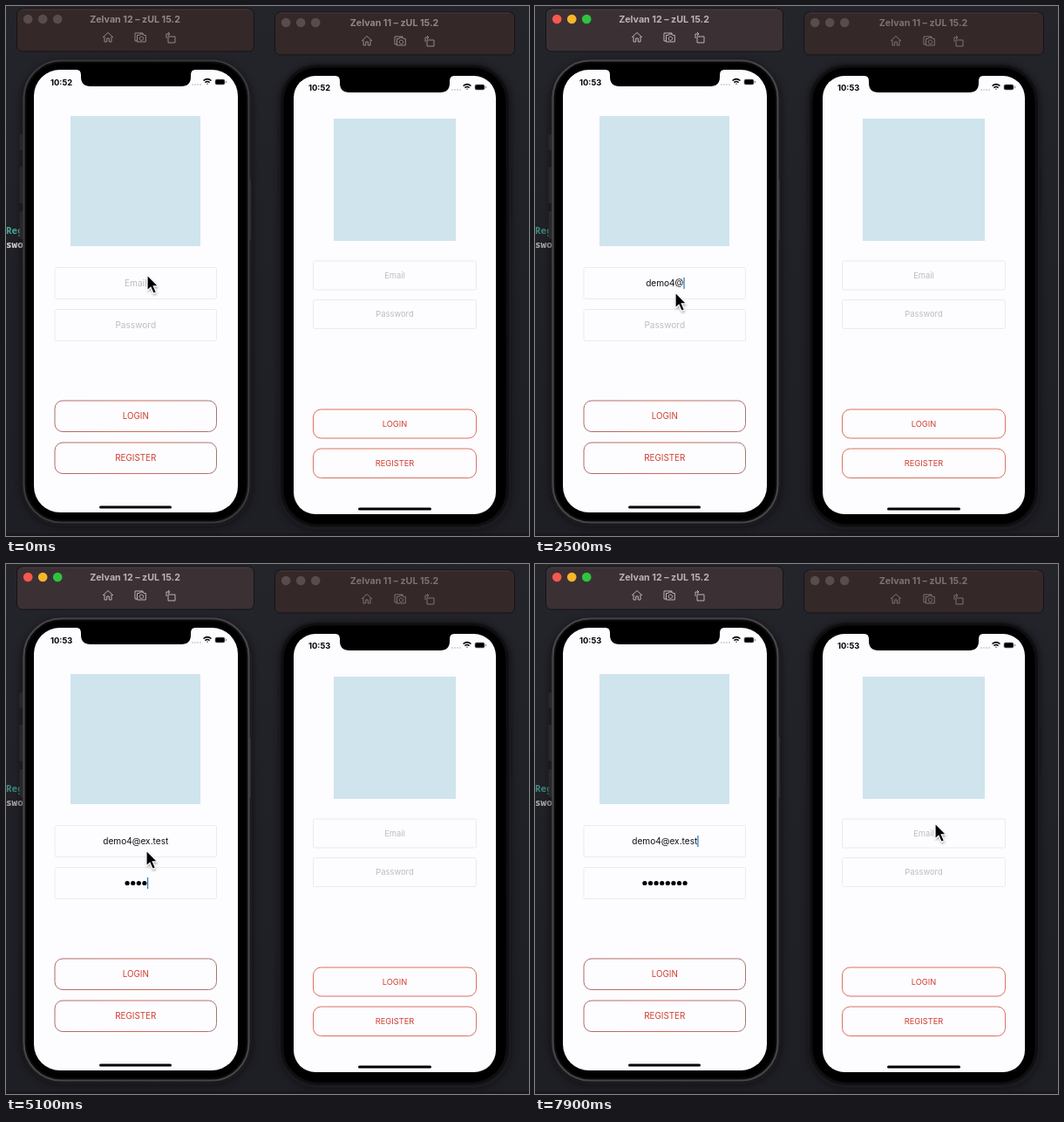
Write an HTML page that moves like this. It is 600 px wide and 607 px high and loops after 8000 ms.

```html
<!DOCTYPE html>
<html lang="en">
<head>
<meta charset="utf-8">
<title>Login screens</title>
<style>
  html, body { margin: 0; width: 100%; height: 100%; overflow: hidden; background: #202027; }
  svg { display: block; width: 100vw; height: 100vh; }
  text { font-family: Inter, Roboto, sans-serif; white-space: pre; }
  .mid { text-anchor: middle; }
  .code { font: bold 11px "Noto Sans Mono", "DejaVu Sans Mono", monospace; }
</style>
</head>
<body>
<svg id="stage" viewBox="0 0 600 607" xmlns="http://www.w3.org/2000/svg"></svg>
<script>
const EMAIL = 'demo4@ex.test';
const LIGHTS = ['#f9574f', '#f7b52c', '#2fc440'];
const PAPER = '#fdfcff';
const stage = document.getElementById('stage');

const rect = (x, y, w, h, r, fill, more = '') =>
  `<rect x="${x}" y="${y}" width="${w}" height="${h}" rx="${r}" fill="${fill}" ${more}/>`;
const label = (x, y, size, fill, text, more = '') =>
  `<text class="mid" x="${x}" y="${y}" font-size="${size}" fill="${fill}" ${more}>${text}</text>`;

// Window bar with three lights, a title and home, camera and rotate icons.
function titleBar(id, x, y, w, title, icons) {
  const lights = LIGHTS.map((c, i) =>
    `<circle cx="${x + 12.7 + 17 * i}" cy="${y + 12}" r="5.3"/>`).join('');
  const shapes = [
    'M-6 0L0-5.5 6 0M-4 -1V5H-1.3V1H1.3V5H4V-1',
    'M-3.5 4H-6V-5H3V-3M-3.5-2.5H-1L0-4H3L4-2.5H6.3V5H-3.5ZM1.4-1a2.2 2.2 0 1 0 .01 0',
    'M-3-1H5V6H-3ZM-5 1V-4H-1M-3-6L-1-4-3-2'
  ].map((d, i) => `<path d="${d}" transform="translate(${icons[i]} ${y + 33})"/>`).join('');
  return `<g id="${id}">
    ${rect(x, y, w, 49, 6, '#352829', 'stroke="#151317"')}
    <path d="M${x + 6} ${y + 1}h${w - 12}" stroke="#534748" stroke-width=".7"/>
    ${lights}
    ${label(x + w / 2 - .5, y + 15.5, 10.7, '#978d8f', title, 'font-weight="700"')}
    <g fill="none">${shapes}</g>
  </g>`;
}

function notch(x, y, w) {
  return `<path d="M${x} ${y - 1}v1q5 0 5 6v2q0 11 11 11h${w - 32}q11 0 11-11v-2q0-6 5-6v-1z"/>`;
}

function status(x, right, y, id) {
  const dots = [0, 3, 6, 9].map(i => `<circle cx="${right - 38 + i}" cy="${y - 1}" r=".8" fill="#aaa"/>`).join('');
  return `<text id="${id}" x="${x}" y="${y}" font-size="9.3" font-weight="700">10:52</text>${dots}
    <g transform="translate(${right - 21} ${y - 1})" fill="none" stroke="#000" stroke-width="1.5">
      <path d="M-4.5-4.5q4.5-3.8 9 0M-2.6-2.4q2.6-2 5.2 0"/><path d="M-1-1.3h2L0 0z" fill="#000" stroke="none"/></g>
    ${rect(right - 12, y - 7, 11, 6, 1.8, '#000', 'stroke="#888" stroke-width=".7"')}
    <path d="M${right + .7} ${y - 5.2}v2.4" stroke="#888"/>`;
}

const field = (x, y, w, h, size, text, id) =>
  rect(x, y, w, h, 2, PAPER, 'stroke="#ebeaed"') +
  label(x + w / 2, y + h / 2 + size * .36, size, '#bdbcc1', text, `id="${id}"`);

const button = (x, y, w, h, size, text, edge) =>
  rect(x, y, w, h, 9, PAPER, `stroke="${edge}"`) +
  label(x + w / 2, y + h / 2 + size * .36, size, '#cf3e2e', text);

const sideKeys = (x, y, w, ys, fill) =>
  ys.map(([top, h]) => rect(x, y + top, w, h, 1.5, fill)).join('');

stage.innerHTML = `
  <defs>
    <linearGradient id="back" x2="0" y2="1">
      <stop stop-color="#24242b"/><stop offset=".5" stop-color="#202027"/><stop offset="1" stop-color="#1e1e25"/>
    </linearGradient>
    <linearGradient id="edge" x2="1">
      <stop stop-color="#a8706a"/><stop offset=".5" stop-color="#cf6c5a"/><stop offset="1" stop-color="#a37773"/>
    </linearGradient>
    <filter id="soft" x="-20%" y="-20%" width="140%" height="140%"><feGaussianBlur stdDeviation="5"/></filter>
    <filter id="drop" x="-50%" y="-50%" width="200%" height="200%"><feGaussianBlur stdDeviation="1.5"/></filter>
  </defs>
  ${rect(0, 0, 600, 607, 0, 'url(#back)')}
  ${rect(0, 604, 600, 3, 0, '#1a181d')}
  <g id="code">
    <text class="code" x="0" y="261" fill="#4ba99a">Register</text>
    <text class="code" x="0" y="277" fill="#d5d5d8">sword</text>
  </g>

  ${rect(18, 64, 264, 532, 46, '#0c0c10', 'opacity=".55" filter="url(#soft)"')}
  ${sideKeys(15.5, 0, 5, [[147, 18], [184, 42], [235, 32]], '#29272a')}
  ${rect(277, 198, 4, 70, 1.5, '#2d2b2f')}
  ${rect(20.5, 62.5, 258, 529, 43, '#0b0b0c', 'id="rim" stroke="#39393b" stroke-width="2.2"')}
  ${rect(23.5, 65.5, 252, 523, 40, '#000')}
  ${rect(32, 73, 234, 507, 30, PAPER)}
  ${notch(81, 73, 136)}
  ${status(51, 252, 91, 'clockA')}
  ${rect(74, 126, 149, 149, 0, '#cfe4ed')}
  ${field(56, 299.5, 185.5, 36, 10.1, 'Email', 'email')}
  ${field(56, 347.5, 185.5, 36, 10.1, 'Password', 'pass')}
  <g id="dots"></g>
  ${button(56, 452, 185.5, 35.5, 9.8, 'LOGIN', 'url(#edge)')}
  ${button(56, 500, 185.5, 35.5, 9.8, 'REGISTER', 'url(#edge)')}
  ${rect(107, 572.5, 83, 3, 1.5, '#000')}
  ${rect(0, 311, 1.2, 13, 0, '#2879bb', 'id="caret" opacity="0"')}

  ${rect(314, 68, 265, 532, 43, '#0c0c10', 'opacity=".5" filter="url(#soft)"')}
  ${sideKeys(312, 0, 4, [[137, 21], [182, 32], [222, 32]], '#17171c')}
  ${rect(577, 185, 4, 58, 1.5, '#17171c')}
  ${rect(314, 66.5, 264, 531, 43, '#0f0f12', 'stroke="#1b1b1f" stroke-width="2"')}
  ${rect(318.5, 70.5, 255, 523, 39, '#000')}
  ${rect(330, 80, 232, 502, 25, PAPER)}
  ${notch(378, 80, 136)}
  ${status(347, 550, 97, 'clockB')}
  ${rect(376, 129, 140, 140, 0, '#cfe4ed')}
  ${field(352.5, 292, 187, 33, 9.4, 'Email', 'emailB')}
  ${field(352.5, 336.5, 187, 33, 9.4, 'Password', 'passB')}
  ${button(352.5, 462, 187, 33, 9.3, 'LOGIN', '#d9735f')}
  ${button(352.5, 507, 187, 33.5, 9.3, 'REGISTER', '#d9735f')}
  ${rect(404, 574.5, 84, 3, 1.5, '#000')}

  ${titleBar('barA', 12.5, 3, 272, 'Zelvan 12 – zUL 15.2', [117, 154, 189])}
  ${titleBar('barB', 308.5, 7, 275, 'Zelvan 11 – zUL 15.2', [414, 452, 486])}

  <g id="pointer">
    <path d="M0 0V18l4-3.8 3.2 7.2 3.3-1.5-3.2-7h5.4z" transform="translate(.5 2)" opacity=".4" filter="url(#drop)"/>
    <path d="M0 0V18l4-3.8 3.2 7.2 3.3-1.5-3.2-7h5.4z" stroke="#fff" stroke-width="1.2"/>
  </g>`;

const el = id => document.getElementById(id);
const set = (node, attrs) => { for (const k in attrs) node.setAttribute(k, attrs[k]); };
const clamp = (v, lo, hi) => Math.max(lo, Math.min(hi, v));

// Pointer stops: time, x, y.
const PATH = [[0, 162, 308], [150, 162, 308], [750, 161, 328], [6300, 161, 328],
              [6900, 196, 486], [7200, 196, 486], [7800, 459, 297], [8000, 459, 297]];

function pointerAt(t) {
  const i = PATH.findIndex(p => p[0] > t);
  const [t0, x0, y0] = PATH[i - 1], [t1, x1, y1] = PATH[i];
  const u = (t - t0) / (t1 - t0), e = u * u * (3 - 2 * u);
  return [x0 + (x1 - x0) * e, y0 + (y1 - y0) * e];
}

function paintBar(id, back, ink, lights) {
  const bar = el(id);
  set(bar.querySelector('rect'), { fill: back });
  set(bar.querySelector('text'), { fill: ink });
  set(bar.querySelector('g'), { stroke: ink });
  bar.querySelectorAll('circle').forEach((n, i) => set(n, { fill: lights[i] }));
}

function activate(on) {
  const grey = Array(3).fill('#584c4d');
  paintBar('barA', on ? '#3b3134' : '#352829', on ? '#bbb3b6' : '#938889', on ? LIGHTS : grey);
  paintBar('barB', '#352829', on ? '#7d7274' : '#938889', grey);
  set(el('rim'), { stroke: on ? '#464648' : '#39393b' });
  set(el('code'), { opacity: on ? .75 : 1 });
}

function draw(t) {
  const [x, y] = pointerAt(t);
  set(el('pointer'), { transform: `translate(${x} ${y})` });
  activate(t >= 900);
  const clock = t < 1600 ? '10:52' : '10:53';
  el('clockA').textContent = el('clockB').textContent = clock;

  const typed = clamp(Math.floor((t - 1400) / 180), 0, EMAIL.length);
  const email = el('email');
  email.textContent = typed ? EMAIL.slice(0, typed) : 'Email';
  set(email, { fill: typed ? '#111' : '#bdbcc1' });

  const count = clamp(Math.floor((t - 4400) / 150), 0, 8);
  set(el('pass'), { opacity: count ? 0 : 1 });
  el('dots').innerHTML = Array.from({ length: count }, (_, i) =>
    `<circle cx="${149 + (i - (count - 1) / 2) * 6.6}" cy="365.5" r="2.6"/>`).join('');

  const inEmail = typed && (t < 4000 || t >= 5900);
  const inPass = count && t < 5900;
  const half = inPass ? count * 3.3 : email.getComputedTextLength() / 2;
  set(el('caret'), { x: 148.8 + half, y: inPass ? 359 : 311, opacity: inEmail || inPass ? 1 : 0 });
}

const start = performance.now();
function tick() {
  draw((performance.now() - start) % 8000);
  requestAnimationFrame(tick);
}
tick();
</script>
</body>
</html>
```
